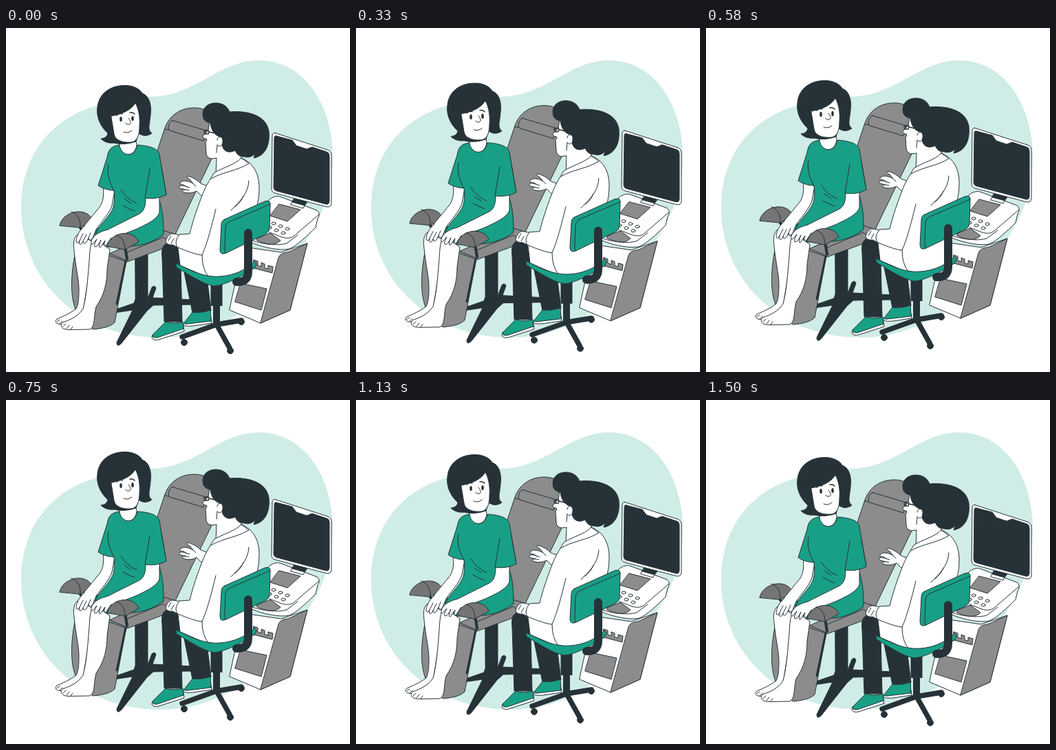
An HTML page for the animation above (1.54 s loop, 500 by 500 pixels).

```html
<!DOCTYPE html>
<html lang="en">
<head>
<meta charset="utf-8">
<title>Consultation</title>
<style>
  html, body { margin: 0; width: 100%; height: 100%; overflow: hidden; background: #fff; }
  svg { display: block; width: 100vw; height: 100vh; }
  #scene { stroke: #263238; stroke-width: 1; stroke-linecap: round; stroke-linejoin: round; fill: none; }
  .w { fill: #fff; }
  .g { fill: #18a086; }
  .s { fill: #8c8c8c; }
  .k { fill: #757575; }
  .d { fill: #263238; }
</style>
</head>
<body>
<svg viewBox="0 0 500 500">
  <path fill="#d0ece6" d="M206 100C240 100 262 89 285 77C312 62 337 47 367 47C436 47 475 115 475 187C475 262 440 305 405 352C360 412 300 450 225 450C100 450 22 360 22 262C22 167 87 116 158 108C180 104 190 100 206 100Z"/>
  <g id="scene">

    <g id="examChair">
      <path class="d" d="M188 325H206V393L212 377Q216 373 218 378L213 392L270 395V402L214 403L205 411L168 458Q161 465 161 457L184 410L157 414V410L186 400L188 394Z"/>
      <path class="s" d="M214 196L231 145C238 126 254 116 274 116C292 116 302 126 302 142C302 160 302 178 299 190L246 300L225 302Z"/>
      <path class="s" d="M242 134.500L291 149L287 164L238 149C234 147 237 135 242 134.500ZM231 147L237 148"/>
      <path class="s" d="M150 328L228 294L250 301C253 310 246 314 238 317L176 340Z"/>
      <path d="M174 327L229 304L237 312"/>
      <path class="s" d="M100 330L149 327L175 338L158 428C152 434 140 437 126 438L103 413C92 392 95 355 100 330Z"/>
      <path d="M151 331L174 339"/>
      <path stroke-width="3" d="M174 339L161 401"/>
    </g>

    <g id="machine">
      <path class="w" d="M345 318L400 326L438 313L413 410L370 429L325 410Z"/>
      <path class="s" d="M396 334C399 326 406 327 412 325L438 313L413 410L370 429Z"/>
      <path class="s" d="M341 371L379 379L371 410L333 398Z"/>
      <path class="s" d="M360 337L366 339V345L371 347V341L376 343V349L381 350V345L388 347L387 356L360 349Z"/>
      <path class="w" d="M383 249C388 245 394 244 398 245L452 265C456 268 456 273 453 277L450 290C438 302 422 317 412 321C400 324 375 320 355 311V295Z"/>
      <path d="M455 271L419 302C414 306 408 306 401 304L383 297M358 309C378 316 398 316 408 313L424 301"/>
      <path class="s" d="M365 306L384 298L399 309C391 317 379 315 365 309Z"/>
      <path class="s" d="M397 256L428 264L409 281L384 273Z"/>
      <g class="w" id="keys"></g>
      <path class="d" d="M423 240L443 246L434 258L416 253Z"/>
      <path class="w" d="M416 253L434 258L432 262L414 257Z"/>
      <path class="w" d="M391 152.500L467 177Q473 179 473 185V254Q473 261 466 260L391 240Q386 239 386 233L387 157Q387 152 391 152.500Z"/>
      <path class="d" d="M393 157L416 163L422 171L437 176L445 173L466 180Q470 181 470 186V251Q470 257 465 256L394 237Q389 236 389 231L390 160Q390 156 393 157Z"/>
    </g>

    <g id="patient">
      <path class="g" d="M112 299L117 290L132 284L134 300Z"/>
      <path stroke-width="4" d="M107 289L113 297"/>
      <path class="k" d="M78 287C82 266 118 258 126 280L108 290Z"/>
      <path d="M95 267C104 270 109 279 108 290"/>
      <path class="w" d="M104 300C97 306 98 315 99 324C101 346 106 365 106 380C106 394 105 402 102 408C93 415 81 420 74 423C69 428 75 432 84 430L110 424L128 312Z"/>
      <path class="w" d="M127 306C121 316 122 330 120 350C118 375 116 393 112 408C105 419 94 424 82 428C77 434 83 439 93 438.500L122 438C130 434 127 420 131 405C143 388 147 370 147 350L151 322Z"/>
      <path d="M74 427L78 424M78 430L82 426M83 434L87 430M88 437L92 432M94 438L97 434"/>
      <path class="w" d="M141 230C143 243 141 252 137 259L114 287L104 302L126 305L131 293C140 280 150 270 154 258L158 236Z"/>
      <path class="g" d="M165 170C168 187 187 190 191 170C206 171 221 174 223 184L233 242L221 246C228 262 229 280 229 300C215 311 201 315 186 317L146 318L130 302C132 288 150 277 156 261C158 252 158 245 157 236C148 236 140 233 134 229L147 188C149 177 152 172 165 170Z"/>
      <path d="M149 199C146 215 152 226 157 237M167 235Q175 248 190 255M172 248L182 255M170 258Q178 263 187 266"/>
      <path class="w" d="M203 247C203 258 201 266 194 270L146 294L130 302L135 315L149 308L188 293C205 285 220 278 223 268L223 246Z"/>
      <path class="g" stroke="none" d="M209 203L202 247C213 249 224 247 233 242L226 203Z"/>
      <path d="M209 205L202 247C213 249 224 247 233 242L226 203"/>
      <path class="w" d="M114 288C105 296 102 304 102 311Q105 314 107 309L106 313Q109 317 112 310Q112 316 117 311L120 305Q122 312 126 305L131 293"/>
      <path d="M107 309L112 299M112 310L117 300M120 305L123 298"/>
      <path stroke-width="4" d="M173 318L176 336"/>
      <path class="k" d="M147 317C153 294 187 293 193 311L173 322Z"/>
      <path d="M160 301C169 303 173 312 173 322"/>
      <path class="w" d="M148 293C137 296 130 299 125 307Q122 315 126 314L132 307Q126 318 130 318Q134 317 138 308Q133 319 137 319L144 309Q141 317 145 317L153 305"/>

      <path class="w" d="M166 160L165 171C168 187 187 189 190 170L188 160Z"/>
      <path class="d" d="M157 167C150 168 143 166 138 161Q147 160 148 153C136 142 131 128 133 115C135 95 152 83.500 172 83.500C185 83 195 89 198 95C208 98 212 112 210 126C209 140 205 148 212 153C205 158 198 157 193 153L189 165Q172 171 157 167Z"/>
      <path class="w" d="M153 128C170 125 182 119 188 109C193 118 195 130 194 143C194 155 191 165 182 166C169 167 158 163 157 154Z"/>
      <g class="d" stroke="none">
        <ellipse cx="167" cy="132.500" rx="1.800" ry="3.600"/>
        <ellipse cx="184" cy="131.500" rx="1.800" ry="3.600"/>
      </g>
      <path stroke-width="1.500" d="M161 127Q165 123 169 125M180 123Q184 122 187 125"/>
      <path d="M178 131C181 135 183 139 179 140Q175 141 174 138M171 151Q177 154 183 149"/>
    </g>

    <g id="doctor">
      <path class="d" d="M258 350L271 414L298 411L292 362Z"/>
      <path class="d" d="M234 313C226 316 226 325 227 335L230 427L256 427L254 345L251 318Z"/>
      <path class="w" d="M258 429L258 432Q262 434 272 433L299 429L298 422Z"/>
      <path class="g" d="M271 413L260 427Q257 431 264 430L298 426L297 410Q284 415 271 413Z"/>
      <path class="w" d="M213 446L212 450Q214 455 222 453L259 441L258 434Z"/>
      <path class="g" d="M232 427L214 445Q211 451 220 450L258 437L257 427Q243 431 232 427Z"/>

      <g transform="translate(0 1)">
        <path class="w" d="M291 228L283 225C276 218 270 216 264 214Q262 217 267 219L272 225C265 221 258 220 254 223Q250 227 258 227L263 230C254 226 250 229 253 232L261 234Q254 234 257 237C264 240 271 239 277 236L284 243L294 236Z"/>
        <path d="M272 225L276 229M263 230L267 231M261 234L266 235"/>
      </g>
      <path class="w" d="M296 136L294 149L286 157Q286 161 291 161L292 163L290 166L291 181Q291 189 299 190L306 189L305 212L343 195L338 160Z"/>
      <path class="w" d="M254 301L243 299C237 298 233 305 232 311Q235 316 242 315L252 320Z"/>
      <path d="M240 302L236 309M244 306L240 313"/>
      <path class="w" d="M342 189C358 195 368 210 368 232C368 246 366 256 362 268L352 347C335 365 305 367 290 361L253 345L250 320Q243 312 252 300L267 299C271 282 279 258 288 236C292 227 297 220 302 211C314 203 333 199 342 189Z"/>
      <path d="M250 319C262 324 278 330 285 330C293 312 299 287 305 263M285 330Q285 350 294 361M298 219C315 209 335 208 353 197L342 189M353 222C352 243 337 254 327 265M345 244Q342 253 333 260"/>
      <path class="d" d="M287 131C283 118 292 109 305 109C315 109 322 114 325 122C345 120 378 124 382 150C384 170 377 186 360 189Q361 185 363 182Q355 190 346 187C339 187 336 184 333 178C323 183 316 179 314 170L311 158C303 156 298 148 297 138Q289 137 287 131Z"/>
      <path class="w" d="M307 163C307 156 316 157 315 165C315 171 311 174 307 170"/>
      <path stroke-width="1.500" d="M288 150Q292 147 295 150L294 154L289 154ZM295 151L308 154"/>
      <path d="M307 170L306 181"/>
    </g>

    <g id="stool">
      <g stroke-width="7.500">
        <path d="M306 431L256 449M306 431L325 465M306 431L342 425"/>
        <path stroke-width="17" stroke-linecap="butt" d="M306 368V404"/>
        <path stroke-width="10" d="M306 402V430"/>
      </g>
      <g class="d">
        <circle cx="259" cy="457" r="4.500"/>
        <circle cx="326" cy="469" r="4.500"/>
        <circle cx="342" cy="427" r="4.500"/>
      </g>
      <path class="g" d="M247 342C264 350 279 359 300 361C325 363 350 352 361 339Q367 343 361 349C342 362 315 375 302 375C285 372 262 356 248 348Z"/>
      <path class="g" d="M318 278L376 252Q385 249 384 258L383 291Q383 296 378 299L320 327Q311 331 311 322L313 286Q313 280 318 278Z"/>
      <path d="M319 327Q317 324 318 318L319 291Q319 284 326 281L384 256"/>
      <path stroke-width="12" d="M352 298V354Q352 370 335 369"/>
    </g>
  </g>
</svg>
<script>
  const LOOP = 1540, STEPS = 37, LIFT = 8;
  const scene = document.getElementById('scene');
  const keys = document.getElementById('keys');

  for (let row = 0; row < 2; row++) {
    for (let col = 0; col < 3; col++) {
      const key = document.createElementNS('http://www.w3.org/2000/svg', 'ellipse');
      const place = { cx: 389 + col * 10 - row * 6, cy: 284 + col * 4 + row * 6, rx: 3, ry: 2 };
      for (const name in place) key.setAttribute(name, place[name]);
      keys.append(key);
    }
  }

  // Rise and fall once per loop, advancing in even steps; the last step rests at the start.
  function draw(now) {
    const step = Math.floor((now % LOOP + 4) / LOOP * STEPS) % STEPS;
    const phase = step / (STEPS - 1) * 2 * Math.PI;
    const y = -LIFT * (1 - Math.cos(phase)) / 2;
    scene.setAttribute('transform', `translate(0 ${y.toFixed(2)})`);
  }

  const start = performance.now();
  function tick() {
    draw(performance.now() - start);
    requestAnimationFrame(tick);
  }
  tick();
</script>
</body>
</html>
```
